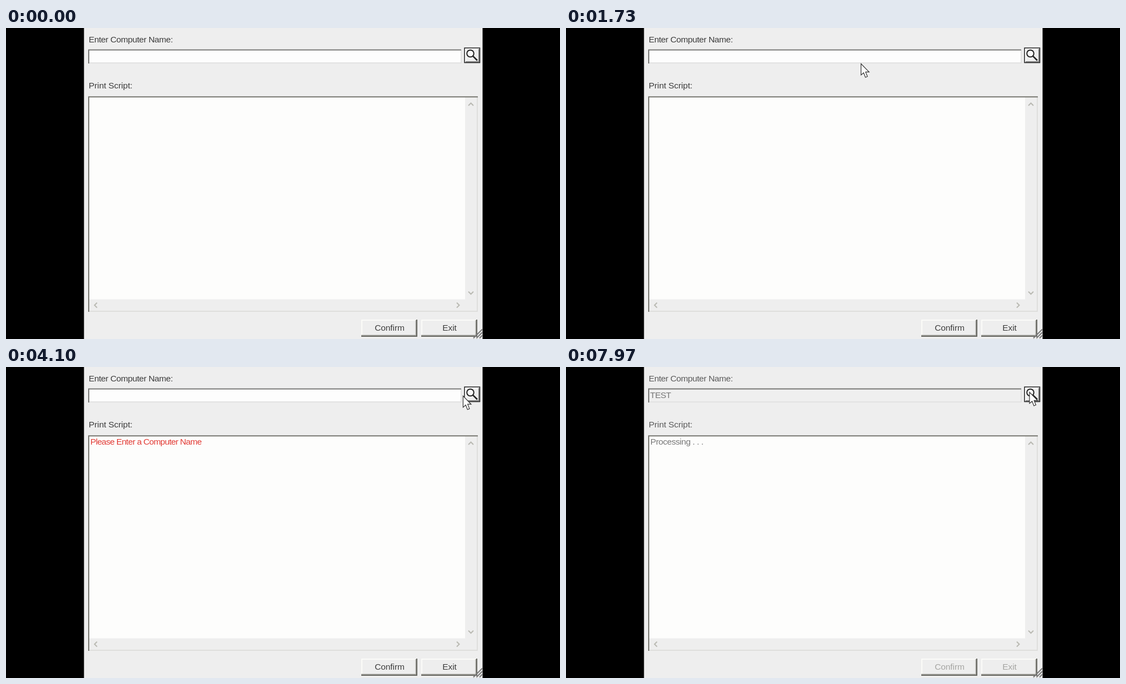
Write an HTML page that moves like this. It is 998x561 px and loops after 8 s.

```html
<!DOCTYPE html>
<html lang="en">
<head>
<meta charset="utf-8">
<title>Computer name dialog</title>
<style>
html, body { margin: 0; height: 100%; overflow: hidden; background: #000; }
svg { display: block; width: 100vw; height: 100vh; }
text { font: 15.5px "Liberation Sans", Arial, sans-serif; fill: #3c3c3c; white-space: pre; }
.line { fill: none; stroke-width: 2; }
.off .label { fill: #5a5a5a; }
.off .btn { fill: #a5a5a2; }
.off #typed { fill: #777; }
.off #field { fill: #efefef; }
</style>
</head>
<body>
<svg id="stage" viewBox="0 0 998 561">
  <rect width="998" height="561"/>
  <rect x="140.5" width="718" height="561" fill="#eeeeee"/>
  <text class="label" x="149" y="25.5" letter-spacing="-.4">Enter Computer Name:</text>
  <text class="label" x="149" y="108.7" letter-spacing="-.1">Print Script:</text>

  <rect id="field" x="148" y="38" width="673" height="26" fill="#fdfdfd"/>
  <path class="line" d="M148 63H820V39" stroke="#e2e2e2"/>
  <path class="line" d="M149 64V39.5H820" stroke="#777775" stroke-width="2.5"/>
  <text id="typed" x="151.5" y="56.3" letter-spacing="-.55"></text>
  <rect id="caret" y="42" width="1.3" height="18" fill="#222"/>

  <rect x="148" y="123" width="702" height="389" fill="#eeeeee"/>
  <rect x="150" y="125" width="677" height="364.5" fill="#fdfdfc"/>
  <path class="line" d="M149 511H849V125" stroke="#dededc"/>
  <path class="line" d="M149 512V124.3H850" stroke="#777770"/>
  <path class="line" d="M833 140l4.5-4.5 4.5 4.5M833 475.5l4.5 4.5 4.5-4.5M164 495.5l-4.5 4.5 4.5 4.5M812 495.5l4.5 4.5-4.5 4.5" stroke="#b9b9b2"/>
  <text id="message" x="152" y="140.2"></text>

  <g id="buttons"></g>
  <path d="M842 559.5L858 543.5M847.5 559.5L858 549M853 559.5L858 554.5" class="line" stroke="#777"/>

  <rect x="826" y="36" width="27.5" height="26.5" fill="#eeeeee" stroke="#222" stroke-width="1.5"/>
  <path class="line" d="M828 61V38H852" stroke="#fff"/>
  <path class="line" d="M828 61H852V38" stroke="#777" stroke-width="1.5"/>
  <circle cx="836.5" cy="46" r="6.3" fill="#f8f8f8" stroke="#222" stroke-width="2"/>
  <path d="M841.3 50.8L849 58.5" stroke="#222" stroke-width="2.6"/>

  <path id="arrow" d="M.5 .5V20.8L5.2 16.7 8.4 25 12 23.5 8.7 15.4H15Z" fill="#fff" stroke="#333" stroke-width="1.2"/>
  <path id="beam" d="M-4 -10.5H-1L0 -9.5 1 -10.5H4M0 -9.5V9.5M-4 10.5H-1L0 9.5 1 10.5H4" fill="none" stroke="#222" stroke-width="1.4"/>
</svg>
<script>
const $ = id => document.getElementById(id);
const LOOP = 8000, BLINK = 530, WORD = 'TEST';
const APPEAR = 1250, FIRST_CLICK = 2970, FOCUS = 4730, TYPE = 5570, KEY_GAP = 143, SUBMIT = 7570;
const lastKey = TYPE + KEY_GAP * (WORD.length - 1);

// Mouse stops: time, x, y
const stops = [
  [1250, 500, 561], [1700, 531, 64], [1740, 531, 64], [2600, 837, 52], [3900, 837, 52],
  [4650, 757.5, 51], [5050, 757.5, 51], [5350, 764.5, 51], [7070, 764.5, 51], [7400, 834.5, 45]
];

function button(label, x) {
  return `<rect x="${x}" y="526" width="101" height="31" fill="#eeeeee"/>
    <path class="line" d="M${x + 1} 556V527H${x + 100}" stroke="#fbfbf8"/>
    <path class="line" d="M${x} 554.5H${x + 98.5}V527" stroke="#aaaaa5"/>
    <path class="line" d="M${x} 556H${x + 100}V526" stroke="#666660"/>
    <text class="btn" x="${x + 51}" y="546" text-anchor="middle" letter-spacing="-.1">${label}</text>`;
}
$('buttons').innerHTML = button('Confirm', 640) + button('Exit', 748);

function mouseAt(t) {
  const i = stops.findIndex(s => s[0] > t);
  if (i < 0) return stops[stops.length - 1].slice(1);
  if (i === 0) return stops[0].slice(1);
  const [t0, x0, y0] = stops[i - 1], [t1, x1, y1] = stops[i];
  const u = (t - t0) / (t1 - t0), k = u * u * (3 - 2 * u);
  return [x0 + (x1 - x0) * k, y0 + (y1 - y0) * k];
}

const inside = (x, y, l, t, r, b) => x > l && x < r && y > t && y < b;
const show = (el, on) => el.setAttribute('visibility', on ? 'visible' : 'hidden');

function setMessage(text, color, spacing) {
  const m = $('message');
  m.textContent = text;
  m.style.fill = color;
  m.setAttribute('letter-spacing', spacing);
}

function caretOn(t) {
  if (t < FOCUS || t >= SUBMIT) return false;
  const since = t < TYPE ? t - FOCUS : Math.max(0, t - lastKey);
  return Math.floor(since / BLINK) % 2 === 0;
}

function draw(t) {
  const busy = t >= SUBMIT;
  $('stage').classList.toggle('off', busy);
  if (busy) setMessage('Processing . . .', '#777', -.45);
  else if (t >= FIRST_CLICK) setMessage('Please Enter a Computer Name', '#e23b35', -.7);
  else setMessage('', '#333', 0);

  const count = Math.max(0, Math.min(WORD.length, Math.floor((t - TYPE) / KEY_GAP) + 1));
  $('typed').textContent = WORD.slice(0, count);
  $('caret').setAttribute('x', 151 + (count ? $('typed').getComputedTextLength() + .5 : 0));
  show($('caret'), caretOn(t));

  const [x, y] = mouseAt(t);
  const overText = inside(x, y, 148, 39, 821, 63) || inside(x, y, 150, 126, 827, 490);
  for (const [id, on] of [['arrow', !overText], ['beam', overText]]) {
    show($(id), on && t >= APPEAR);
    $(id).setAttribute('transform', `translate(${x} ${y})`);
  }
}

const start = performance.now();
function frame() {
  draw((performance.now() - start) % LOOP);
  requestAnimationFrame(frame);
}
frame();
</script>
</body>
</html>
```
